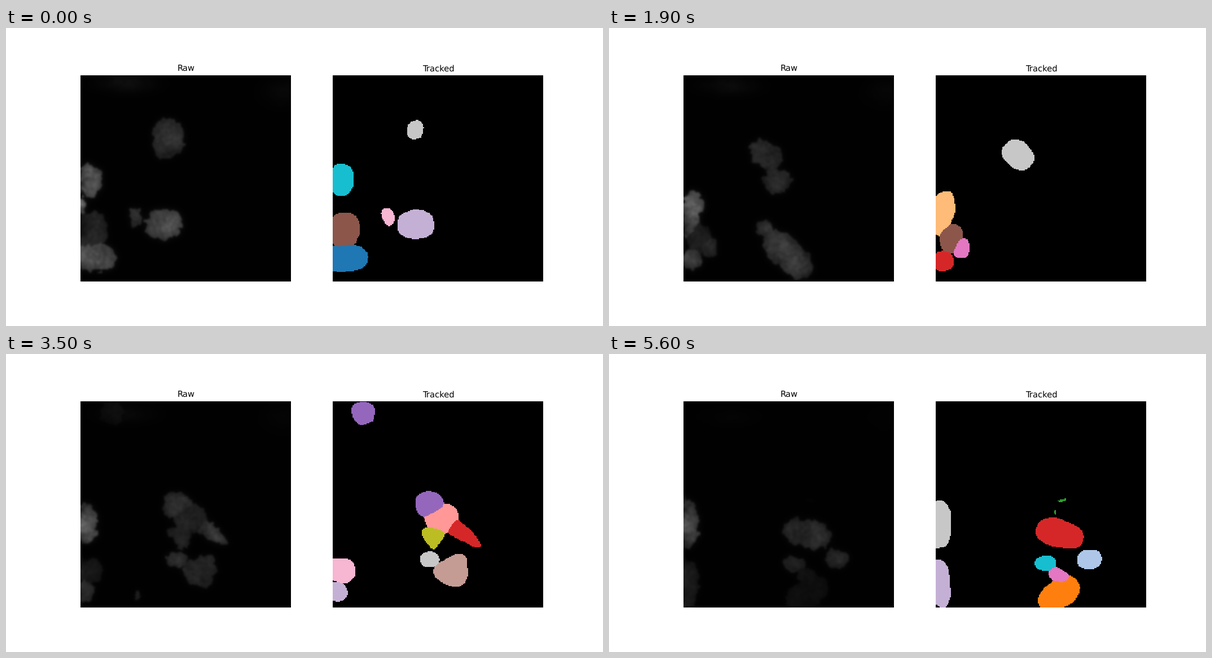
Write a matplotlib script that moves like this. It is 1058 px wide and 529 px high and loops after 5700 ms.

```python
import numpy as np
import matplotlib.pyplot as plt
from matplotlib.animation import FuncAnimation

FRAMES, STEP = 57, 100
W, H = 224, 220
PX = 372.7 / W
KEYS = np.array([0, 7, 19, 27, 35, 49, 56])  # frames where the labelling changes
TAB20 = (np.array(plt.get_cmap("tab20").colors) * 255).round().astype(np.uint8)

gx, gy = np.meshgrid((np.arange(W) + 0.5) * PX - 0.5, (np.arange(H) + 0.5) * PX)
rng = np.random.default_rng(4)


def blur(img, sigma):
    p = 16
    a = np.pad(img, p, mode="edge")
    fy = np.fft.fftfreq(a.shape[0])[:, None]
    fx = np.fft.rfftfreq(a.shape[1])[None]
    gain = np.exp(-2 * (np.pi * sigma) ** 2 * (fx**2 + fy**2))
    return np.fft.irfft2(np.fft.rfft2(a) * gain, a.shape)[p:-p, p:-p]


def noise(sigma):
    n = blur(rng.standard_normal((H, W)), sigma)
    return n / n.std()


def warped(amount, sigma):
    return gx + amount * noise(sigma), gy + amount * noise(sigma)


class Cell:
    """A drifting rounded body, seen in both panels.

    colors: tab20 index by labelling key, unlabelled elsewhere.
    greys: brightness at the first and last pose.
    poses: (frame, x, y, rx, ry, tilt, taper), the last two optional.
    """

    def __init__(self, colors, greys, *poses):
        self.colors, self.greys = colors, greys
        self.poses = np.array([p + (0,) * (7 - len(p)) for p in poses], float)
        self.time = self.poses[:, 0]

    def alive(self, key):
        return self.time[0] <= key <= self.time[-1]

    def grey(self, t):
        return np.interp(t, self.time[[0, -1]], self.greys)

    def field(self, t, x, y):
        """Grows from 0 at the centre to 1 on the outline."""
        cx, cy, rx, ry, tilt, taper = (
            np.interp(t, self.time, col) for col in self.poses.T[1:])
        c, s = np.cos(np.radians(tilt)), np.sin(np.radians(tilt))
        u = ((x - cx) * c + (y - cy) * s) / rx
        v = ((y - cy) * c - (x - cx) * s) / ry
        v = v / np.clip(1 + taper * u, 0.15, 2)
        return (u * u) ** 1.2 + (v * v) ** 1.2


cells = [
    # upper group, which slides down and merges into one long body
    Cell({0: 15, 19: 15, 27: 15, 35: 8}, (44, 40),
         (0, 146, 98, 14, 17), (19, 146, 142, 30, 23, 40), (35, 171, 184, 25, 23)),
    Cell({27: 19, 35: 7}, (44, 30),
         (0, 155, 114, 27, 36, 10, -0.2), (7, 148, 115, 27, 33),
         (19, 166, 189, 24, 23), (27, 164, 190, 28, 23), (35, 193, 208, 30, 25)),
    Cell({27: 5, 35: 6, 49: 6, 56: 6}, (48, 36),
         (27, 190, 213, 30, 18, 105), (35, 233, 236, 36, 13, 37, -0.4),
         (49, 225, 241, 54, 23, 38), (56, 219, 235, 43, 25, 15)),
    Cell({56: 1}, (34, 32), (49, 272, 285, 24, 13, 30), (56, 272, 281, 21, 17)),
    Cell({35: 16}, (28, 28), (35, 178, 243, 20, 18, 90, -0.6)),
    # lower group
    Cell({0: 9, 7: 13, 27: 18, 35: 11, 49: 12, 56: 12}, (64, 18),
         (0, 147, 265, 32, 26), (7, 160, 267, 33, 36, -10, 0.5),
         (19, 184, 318, 54, 27, 42), (27, 197, 312, 38, 24, 28),
         (35, 213, 304, 28, 29, 60, -0.4), (56, 218, 311, 20, 13, 40)),
    Cell({0: 13, 7: 18, 27: 13, 35: 15, 49: 18, 56: 18}, (50, 30),
         (0, 97, 251, 11, 16, -20), (27, 162, 279, 16, 14), (56, 194, 288, 19, 14)),
    Cell({49: 2, 56: 2}, (14, 12), (49, 212, 341, 20, 21), (56, 218, 343, 40, 25, -35)),
    # cells on the left edge
    Cell({0: 18, 7: 15}, (82, 55), (0, 15, 187, 22, 29), (7, 7, 183, 16, 24)),
    Cell({19: 3, 56: 15}, (92, 62),
         (0, -4, 233, 11, 17), (19, 11, 247, 20, 41, 15),
         (27, 6, 219, 26, 32), (56, 3, 218, 24, 43)),
    Cell({49: 15}, (72, 72), (49, 8, 208, 13, 19)),
    Cell({49: 19}, (40, 40), (49, 5, 270, 9, 10)),
    Cell({0: 10, 19: 10, 35: 13}, (34, 20),
         (0, 18, 275, 29, 32), (19, 27, 290, 21, 25), (35, 15, 301, 26, 21)),
    Cell({0: 0, 19: 6, 27: 6, 35: 9, 49: 9, 56: 9}, (68, 22),
         (0, 22, 324, 40, 25), (19, 13, 329, 19, 18), (35, 7, 338, 18, 17),
         (49, 7, 322, 20, 35), (56, 7, 325, 19, 42)),
    Cell({19: 12}, (36, 36), (19, 45, 307, 14, 18)),
    # faint bodies and specks
    Cell({7: 3}, (12, 12), (7, 100, 15, 23, 16, 15)),
    Cell({35: 8}, (9, 9), (35, 54, 21, 20, 20)),
    Cell({56: 4}, (3, 3), (56, 224, 177, 8, 2, -10)),
    Cell({56: 4}, (3, 3), (56, 211, 198, 1.5, 4)),
    Cell({}, (34, 34), (35, 100, 343, 4, 7, -20), (49, 106, 331, 4, 4)),
]

ragged = warped(2, 1.6)
smooth = warped(0.8, 4)
texture = 1 + 0.06 * noise(1.4) + 0.12 * noise(6)


def nearest_key(t):
    return KEYS[np.argmin(abs(KEYS - t - 0.01))]


def territory(group, t, grid):
    """Index of the closest cell at each pixel, and its field there."""
    fields = np.array([c.field(t, *grid) for c in group])
    return fields.argmin(0), fields.min(0)


def haze(x, y, wide, high):
    return np.exp(-((gx - x) / wide) ** 2 - ((gy - y) / high) ** 2)


def raw_image(t):
    group = [c for c in cells if c.alive(nearest_key(t))]
    owner, depth = territory(group, t, ragged)
    grey = np.array([c.grey(t) for c in group])[owner]
    img = np.where(depth < 1, grey * (1.08 - 0.25 * depth), 0)
    img = 0.7 * blur(img, 0.9) + 0.3 * blur(img, 3.5)
    fade = 1 - 0.8 * t / FRAMES
    img += fade * (12 * haze(80, 15 + t / 4, 45, 15) + 6 * haze(360, 32, 35, 22))
    return np.clip(img * texture + 1.5, 0, 255)


def label_image(t):
    key = nearest_key(t)
    group = [c for c in cells if key in c.colors]
    owner, depth = territory(group, t, smooth)
    colors = TAB20[[c.colors[key] for c in group]]
    return np.where(depth[..., None] < 1, colors[owner], 0).astype(np.uint8)


plt.rcParams["text.hinting"] = "none"
fig, axes = plt.subplots(1, 2, figsize=(11.5, 5.75), dpi=92, facecolor="white")
views = [
    axes[0].imshow(raw_image(0), cmap="gray", vmin=0, vmax=255, interpolation="bilinear"),
    axes[1].imshow(label_image(0), interpolation="nearest"),
]
for ax, title in zip(axes, ("Raw", "Tracked")):
    ax.set_title(title, fontsize=11.5, pad=5.75, family="DejaVu Sans")
    ax.axis("off")


def update(t):
    views[0].set_data(raw_image(t))
    views[1].set_data(label_image(t))
    return views


anim = FuncAnimation(fig, update, frames=FRAMES, interval=STEP, repeat=True, repeat_delay=0)
plt.show()
```
